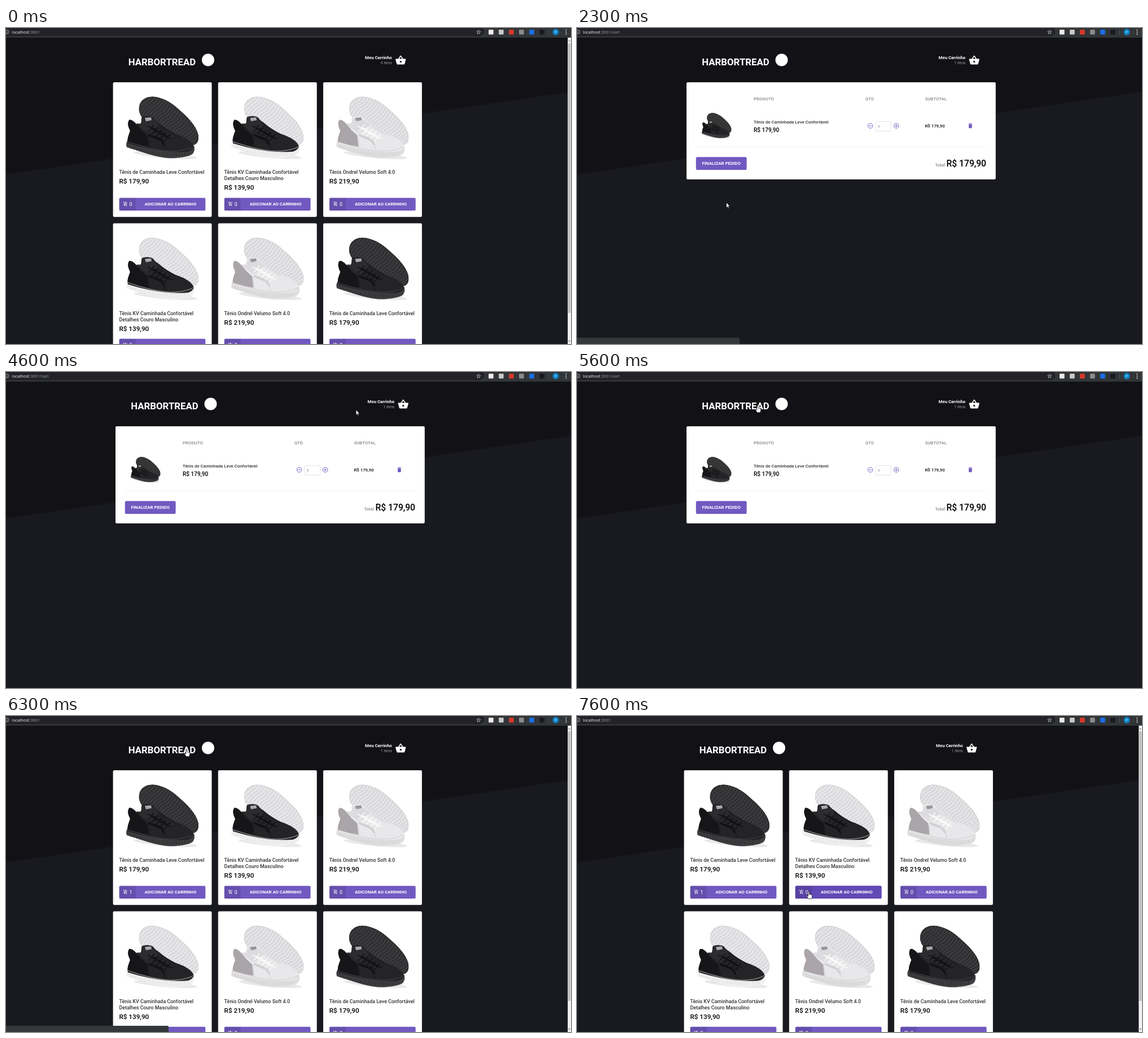
An HTML page that plays this animation: 1001x559 px, repeating every 8000 ms.

```html
<!DOCTYPE html>
<html lang="pt-BR">
<head>
<meta charset="utf-8">
<title>Loja</title>
<style>
html, body { margin: 0; width: 100%; height: 100%; overflow: hidden; background: #191920; }
svg { display: block; width: 100vw; height: 100vh; }
text { font-family: Roboto, sans-serif; white-space: pre; }
.url { font-family: "Open Sans", "Noto Sans", sans-serif; }
</style>
</head>
<body>
<svg id="stage" viewBox="0 0 1001 559"></svg>
<script>
const LOOP = 8000, STEP = 100;
const PURPLE = '#7159c1', PITCH_X = 186.2, PITCH_Y = 249.4;

const text = (x, y, str, size, weight, fill, anchor = 'start', id = '') =>
  `<text ${id && `id="${id}"`} x="${x}" y="${y}" font-size="${size}" font-weight="${weight}" fill="${fill}" text-anchor="${anchor}">${str}</text>`;
const rect = (x, y, w, h, fill, r = 0, extra = '') =>
  `<rect x="${x}" y="${y}" width="${w}" height="${h}" rx="${r}" fill="${fill}" ${extra}/>`;
const icon = (x, y, size, fill, d) =>
  `<path transform="translate(${x} ${y}) scale(${size / 24})" fill="${fill}" d="${d}"/>`;
const line = (d, stroke, width) =>
  `<path d="${d}" fill="none" stroke="${stroke}" stroke-width="${width}" stroke-linecap="round"/>`;

const ICONS = {
  basket: 'M17.21 9l-4.38-6.56c-.19-.28-.51-.42-.83-.42-.32 0-.64.14-.83.43L6.79 9H2c-.55 0-1 .45-1 1 0 .09.01.18.04.27l2.54 9.27c.23.84 1 1.46 1.92 1.46h13c.92 0 1.69-.62 1.93-1.46l2.54-9.27L23 10c0-.55-.45-1-1-1h-4.79zM9 9l3-4.4L15 9H9zm3 8c-1.1 0-2-.9-2-2s.9-2 2-2 2 .9 2 2-.9 2-2 2z',
  addCart: 'M11 9h2V6h3V4h-3V1h-2v3H8v2h3v3zm-4 9c-1.1 0-2 .9-2 2s.9 2 2 2 2-.9 2-2-.9-2-2-2zm10 0c-1.1 0-2 .9-2 2s.9 2 2 2 2-.9 2-2-.9-2-2-2zm-9.83-3.25l.03-.12.9-1.63h7.45c.75 0 1.41-.41 1.75-1.03l3.86-7.01L19.42 4h-.01l-1.1 2-2.76 5H8.53l-.13-.27L6.16 6l-.95-2-.94-2H1v2h2l3.6 7.59-1.35 2.45c-.16.28-.25.61-.25.96 0 1.1.9 2 2 2h12v-2H7.42c-.13 0-.25-.11-.25-.25z',
  trash: 'M6 19c0 1.1.9 2 2 2h8c1.1 0 2-.9 2-2V7H6v12zM19 4h-3.5l-1-1h-5l-1 1H5v2h14V4z',
  star: 'M12 3l2.7 6.2 6.7.6-5.1 4.4 1.5 6.6-5.8-3.5-5.8 3.5 1.5-6.6-5.1-4.4 6.7-.6z'
};

// Sneakers: a tilted outsole behind, a side view in front
const OUTSOLE = 'M236 147C234 132 243 122 259 121.5C276 122 292 131 306 144C321 157 336 172 340 187C343 200 338 208 328 207C315 206 300 198 285 190C262 178 240 165 236 147Z';
const UPPER = 'M218 163C222 161 227 166 231 170L238 170C241 166 239 160 241 157.500C248 155 255 155.500 260 158C263 162 266 165 270 167C280 176 290 182 300 187C315 192 330 199 333 210C330 216 325 219 318 219C280 221 250 214 216 204C214 196 218 188 220 182C216 174 215 168 218 163Z';
const MIDSOLE = 'M216 198C240 207 262 214 285 216.500C305 218 325 214 333 208C335 214 334 220 329 224C318 229 300 231 285 230C262 228 235 217 214 211C212 206 213 202 216 198Z';
const HEEL = 'M218 163C222 161 227 166 231 170L240 181L250 190L252 210Q233 207 216 202C214 196 218 188 220 182C216 174 215 168 218 163Z';

function shoe(c) {
  let ribs = '', laces = '', notches = '';
  for (let i = 0; i < 25; i++) {
    const x = 237 + i * 4.3, y = 122 + i * 3.4;
    ribs += `M${x + 18} ${y - 22}Q${x + 7} ${y - 2} ${x} ${y}T${x - 18} ${y + 22}`;
  }
  for (let i = 0; i < 5; i++) {
    const x = 253 + i * 7, y = 174 + i * 4.2;
    laces += `M${x} ${y + 9}L${x + 9} ${y - 2}M${x - 2} ${y}L${x + 12} ${y + 5}`;
  }
  for (let i = 0; i < 21; i++) {
    const x = 219 + i * 5.1, k = i / 20;
    const y = 207 + 38 * k - 26 * k * k;
    notches += `M${x} ${y}l2 6`;
  }
  return `<ellipse cx="282" cy="225" rx="56" ry="5" fill="#e9e9ea" transform="rotate(5 282 225)"/>
    <path d="${OUTSOLE}" fill="${c.out}"/>
    <g clip-path="url(#outsole)">${line(ribs, c.rib, 1.4)}${line(OUTSOLE, c.rib, 2)}</g>
    <path d="${MIDSOLE}" fill="${c.mid}"/>${line(notches, c.notch, 1)}
    <path d="${UPPER}" fill="${c.upper}"/>
    <path d="${HEEL}" fill="${c.heel}"/>
    <path d="M231 169L239 169L243 160L262 163L272 171L254 186Q242 181 231 169Z" fill="${c.tongue}"/>
    ${line('M250 190L254 211M253 188L278 197L283 215M268 170Q286 180 300 189', c.seam, .9)}
    ${line('M254 190L274 198L280 206', c.seam, 3)}
    ${line(laces, c.lace, 1.7)}
    <path d="M246 159L257 158L258 163L248 165Z" fill="${c.label}"/>
    ${line('M216 201C240 209 262 215.500 285 217.500C305 219 325 215 333 209', c.edge, .8)}`;
}

const black = {
  out: '#3a3a3c', rib: '#272729', mid: '#3d3d40', notch: '#29292b', upper: '#242426',
  heel: '#161618', tongue: '#2c2c2e', seam: '#111113', lace: '#121214', label: '#a9a9ab', edge: '#4a4a4d'
};
const duo = {
  ...black, out: '#e6e6e8', rib: '#d2d2d5', mid: '#f0f0f1', notch: '#dcdcdf', edge: '#d4d4d7'
};
const white = {
  out: '#e4e4e6', rib: '#cfcfd2', mid: '#dededf', notch: '#cbcbcd', upper: '#e8e8ea',
  heel: '#aaa5a8', tongue: '#dcdcdf', seam: '#cfced1', lace: '#fafafa', label: '#98979b', edge: '#c9c9cc'
};

const goods = {
  black: { lines: ['Tênis de Caminhada Leve Confortável'], price: '179,90' },
  duo: { lines: ['Tênis KV Caminhada Confortável', 'Detalhes Couro Masculino'], price: '139,90' },
  white: { lines: ['Tênis Ondrel Velumo Soft 4.0'], price: '219,90' }
};

function card(kind, i) {
  const { lines, price } = goods[kind];
  const extra = (lines.length - 1) * 11.2;
  return `<g transform="translate(${(i % 3) * PITCH_X} ${Math.floor(i / 3) * PITCH_Y})">
    ${rect(189.6, 96, 174.9, 238.2, '#fff', 2.2)}
    <use href="#${kind}"/>
    ${lines.map((s, n) => text(200.4, 258.2 + n * 11.2, s, 8.94, 500, '#333')).join('')}
    ${text(200.4, 275.2 + extra, 'R$ ' + price, 11.74, 500, '#000')}
    ${rect(200.6, 300.4, 152.7, 22.7, PURPLE, 2.2)}
    ${rect(200.6, 300.4, 152.7, 22.7, '#6249b5', 2.2, `id="hover${i}" opacity="0"`)}
    <path d="M229.700 300.400v22.700h-26.900q-2.200 0-2.200-2.200v-18.300q0-2.200 2.200-2.200z" fill="#000" opacity=".1"/>
    ${icon(207, 306.8, 8.94, '#fff', ICONS.addCart)}
    ${text(218.6, 314.6, '0', 8.94, 400, '#fff', 'start', 'qty' + i)}
    ${text(291.5, 314.3, 'ADICONAR AO CARRINHO', 7.78, 700, '#fff', 'middle')}
  </g>`;
}

const header = `
  ${text(216.8, 65.7, 'HARBORTREAD', 16.8, 700, '#fff')}
  <circle cx="358" cy="56.500" r="11" fill="#fff"/>
  ${text(683.8, 55, 'Meu Carrinho', 7.83, 700, '#fff', 'end')}
  ${text(683.8, 64.4, '0 itens', 6.7, 400, '#999', 'end', 'items')}
  ${icon(689.2, 47, 20.1, '#fff', ICONS.basket)}`;

const round = (cx, sign) => `<circle cx="${cx}" cy="173" r="4.300" fill="none" stroke="${PURPLE}" stroke-width=".95"/>
  ${line(`M${cx - 2.1} 173h4.200${sign === '+' ? `M${cx} 170.900v4.200` : ''}`, PURPLE, .95)}`;

const cart = `
  ${rect(194, 96, 547.8, 171.7, '#fff', 2.2)}
  ${text(313, 128.1, 'PRODUTO', 7.83, 700, '#999')}
  ${text(510.8, 128.1, 'QTD', 7.83, 700, '#999')}
  ${text(616.4, 128.1, 'SUBTOTAL', 7.83, 700, '#999')}
  <use href="#black" transform="translate(133.700 100.400) scale(.41)"/>
  ${text(313, 169, goods.black.lines[0], 7.83, 500, '#333')}
  ${text(313, 183.6, 'R$ 179,90', 10.06, 500, '#000')}
  ${round(519.6, '-')}${round(565.7, '+')}
  ${rect(528.9, 165.5, 27.6, 17, '#fff', 2, 'stroke="#ddd" stroke-width=".8"')}
  ${text(532.6, 176.9, '1', 7.83, 400, '#666')}
  ${text(616.4, 176, 'R$ 179,90', 7.83, 500, '#111')}
  ${icon(691.3, 167.4, 11.2, PURPLE, ICONS.trash)}
  ${rect(210.8, 209.6, 514.2, .7, '#e6e6e6')}
  ${rect(210.8, 228.2, 89.8, 22.8, PURPLE, 2.2)}
  ${text(255.7, 242.2, 'FINALIZAR PEDIDO', 7.83, 700, '#fff', 'middle')}
  ${text(652, 245.3, 'Total', 7.83, 700, '#999', 'end')}
  ${text(725, 245.4, 'R$ 179,90', 15.65, 500, '#000', 'end')}`;

const scrollbar = `
  ${rect(995.2, 17, 5.8, 542, '#f1f1f1')}
  ${rect(995.8, 27, 4.6, 477, '#c1c1c1')}
  <path d="M996.500 23.500l1.700-2 1.700 2zM996.500 553l1.700 2 1.700-2z" fill="#555"/>`;

const extensions = ['#eceaea', '#c9c9c9', '#d8392c', '#8b8b8b', '#1a6fe8', '#191a1c'];
const browser = `
  ${rect(0, 0, 1001, 17, '#323538')}
  ${rect(-20, -3, 867, 17.4, '#222327', 8)}
  <circle cx="1.800" cy="7" r="3.500" fill="none" stroke="#c4c6c9" stroke-width=".8"/>
  ${line('M1.800 6.600v2.200M1.800 5v.1', '#c4c6c9', .9)}
  <text class="url" x="10.800" y="9.800" font-size="7.270" fill="#9aa0a6"><tspan fill="#f1f3f4">localhost</tspan>:3001<tspan id="path">/cart</tspan></text>
  <path transform="translate(832.800 2.600) scale(.37)" d="${ICONS.star}" fill="none" stroke="#dcdee0" stroke-width="2"/>
  ${extensions.map((c, i) => rect(855 + i * 18, 3, 8.6, 8.6, c, 1)).join('')}
  ${rect(961, 2.5, .7, 10, '#5a5c60')}
  <circle cx="974" cy="7.200" r="5.600" fill="#0a82c4"/>
  ${text(974, 9.5, 'F', 6.3, 400, '#fff', 'middle')}
  ${[3.6, 7.2, 10.8].map(y => `<circle cx="992.300" cy="${y}" r="1" fill="#e4e6e8"/>`).join('')}`;

document.getElementById('stage').innerHTML = `
  <defs>
    <clipPath id="outsole"><path d="${OUTSOLE}"/></clipPath>
    <g id="black">${shoe(black)}</g>
    <g id="duo">${shoe(duo)}</g>
    <g id="white">${shoe(white)}</g>
  </defs>
  ${rect(0, 0, 1001, 559, '#191920')}
  <path d="M0 0H1001V113L0 259Z" fill="#121216"/>
  <g id="header">${header}</g>
  <g id="shop">${['black', 'duo', 'white', 'duo', 'white', 'black'].map(card).join('')}${scrollbar}</g>
  <g id="cart">${cart}</g>
  ${browser}
  <path id="bubble" d="M0 548H286q2 0 2 2V559H0Z" fill="#35383b"/>
  <g id="cursor" stroke="#000" stroke-width=".7" stroke-linejoin="round" fill="#fff">
    <path id="arrow" d="M0 0V9.200L2.100 7.300L3.600 10.600L5 10L3.600 6.800H6.500Z"/>
    <path id="hand" d="M-1 1Q0 -.4 1 1V4.800L5 5.800Q6 6.200 6 8Q6 10.500 4.900 13H-.5L-3 8.800Q-3.300 7 -1.900 7.400L-1 8.300Z"/>
  </g>`;

const $ = id => document.getElementById(id);
const show = (id, on) => { $(id).style.display = on ? '' : 'none'; };
const clamp = v => Math.max(0, Math.min(1, v));
const ramp = (t, start, span) => clamp((t - start) / span);
const within = (t, spans) => spans.some(([a, b]) => t >= a && t < b);

// Pointer moves: start, end, target x, target y
const moves = [
  [400, 1300, 264.5, 308.7],
  [2600, 3100, 324.5, 257],
  [3100, 3400, 319.5, 242],
  [3500, 4400, 574, 76.3],
  [4400, 4900, 705, 49.5],
  [5000, 5600, 319.7, 58.7],
  [6500, 7400, 410.6, 310.4]
];
const hands = [[1400, 2300], [4700, 5200], [5500, 6600], [7500, LOOP]];

function pointer(t) {
  let x = 430, y = -14;
  for (const [a, b, tx, ty] of moves) {
    const k = ramp(t, a, b - a), e = k * k * (3 - 2 * k);
    x += (tx - x) * e;
    y += (ty - y) * e;
  }
  return [x, y];
}

function draw(t) {
  const inCart = t >= 2300 && t < 6200;
  const loading = t >= 6200 && t < 6300;
  const count = t >= 2300 ? 1 : 0;

  show('cart', inCart);
  show('path', inCart);
  show('shop', !inCart && !loading);
  $('header').setAttribute('transform', `translate(${inCart || loading ? 4.5 : 0} 0)`);
  $('items').textContent = count + ' itens';
  for (const i of [0, 5]) $('qty' + i).textContent = i ? 0 : count;

  $('hover0').setAttribute('opacity', t < 2300 ? ramp(t, 1100, 200) : 0);
  $('hover1').setAttribute('opacity', ramp(t, 7200, 300));
  const bubble = within(t, [[2300, 2900]]) ? 1 - ramp(t, 2600, 300)
    : within(t, [[6300, 6800]]) ? 1 - ramp(t, 6500, 300) : 0;
  $('bubble').setAttribute('opacity', bubble);

  const hand = within(t, hands);
  const [x, y] = pointer(t);
  show('cursor', t >= 500);
  show('hand', hand);
  show('arrow', !hand);
  $('cursor').setAttribute('transform', `translate(${x} ${y})`);
}

const begin = performance.now();
function frame() {
  const t = (performance.now() - begin) % LOOP;
  draw(Math.floor(t / STEP) * STEP);
  requestAnimationFrame(frame);
}
frame();
</script>
</body>
</html>
```
